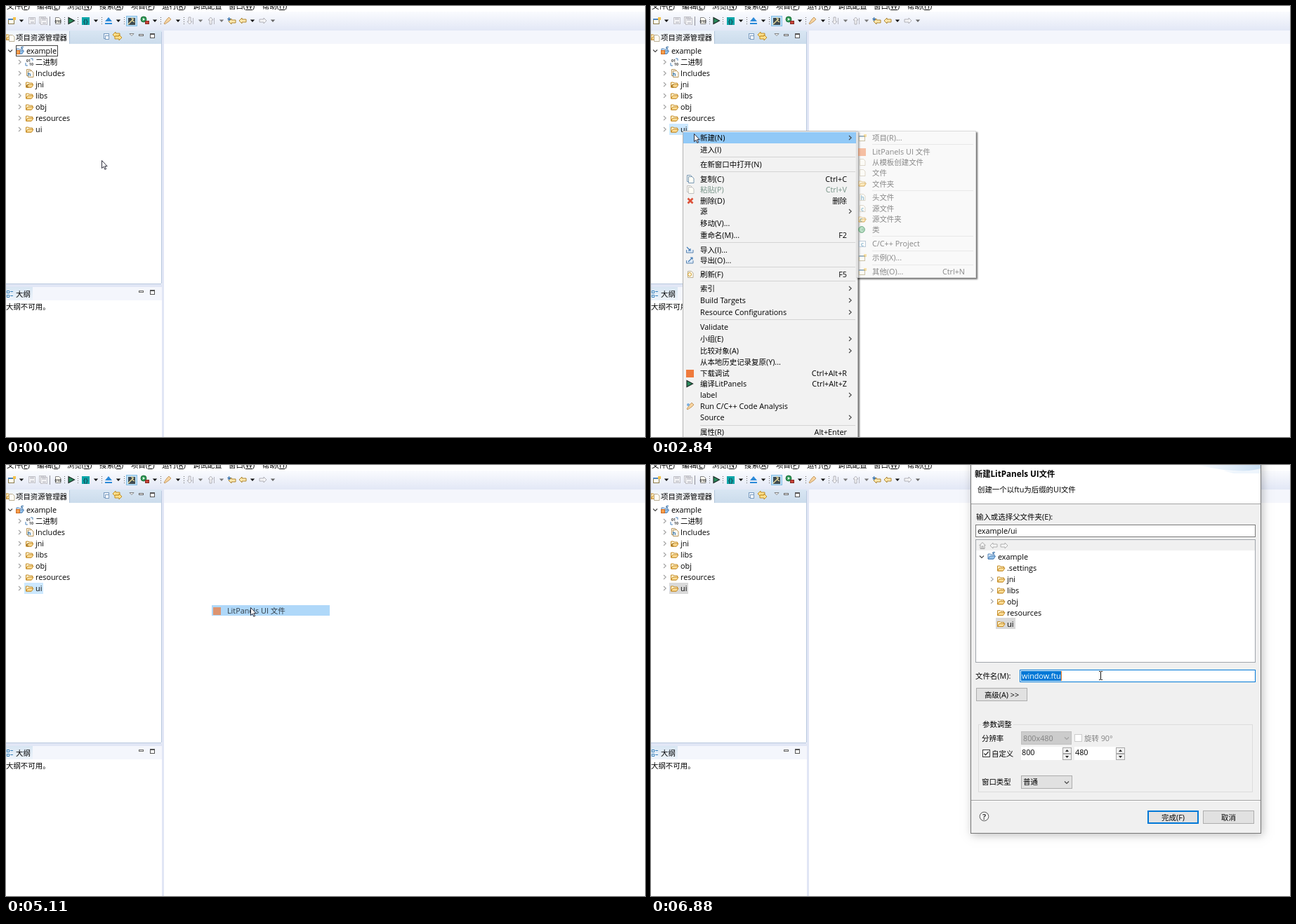
Animation, 910 px wide and 615 px high, one loop 7130 ms. Source, as an HTML page with a canvas:

```html
<!DOCTYPE html>
<html lang="zh-CN">
<head>
<meta charset="utf-8">
<style>
html, body { margin: 0; width: 910px; height: 615px; overflow: hidden; background: #fff; }
canvas { display: block; }
</style>
</head>
<body>
<canvas id="stage" width="910" height="615"></canvas>
<script>
const g = document.getElementById('stage').getContext('2d');
const LOOP = 7130, BLUE = '#0078d7', GOLD = '#c48a24', BRAND = 'LitPanels';

// ---- drawing helpers ----
function rect(x, y, w, h, fill, line) {
  if (fill) { g.fillStyle = fill; g.fillRect(x, y, w, h); }
  if (line) { g.strokeStyle = line; g.lineWidth = 1; g.strokeRect(x + .5, y + .5, w - 1, h - 1); }
}
function fade(y0, y1, a, b) {
  const f = g.createLinearGradient(0, y0, 0, y1);
  f.addColorStop(0, a); f.addColorStop(1, b);
  return f;
}
function shape(x, y, d, fill, line, width = 1) {
  const p = new Path2D(d);
  g.save();
  g.translate(x, y);
  if (fill) { g.fillStyle = fill; g.fill(p); }
  if (line) { g.strokeStyle = line; g.lineWidth = width; g.stroke(p); }
  g.restore();
}
function disc(x, y, r, fill, line) {
  g.beginPath(); g.arc(x, y, r, 0, 7);
  if (fill) { g.fillStyle = fill; g.fill(); }
  if (line) { g.strokeStyle = line; g.lineWidth = 1; g.stroke(); }
}
// Latin and Chinese runs have slightly different sizes; returns the end x.
function text(s, x, y, color = '#000', align = 0, scale = 1, weight = '') {
  const runs = s.match(/[\x00-\xff]+|[^\x00-\xff]+/g).map(r => {
    const size = (r.charCodeAt(0) < 256 ? 10.8 : 10.45) * scale;
    const font = `${weight} ${size}px "Open Sans","Noto Sans CJK SC","Noto Sans CJK",sans-serif`;
    g.font = font;
    return [r, font, g.measureText(r).width];
  });
  x -= align * runs.reduce((sum, r) => sum + r[2], 0);
  g.fillStyle = color;
  for (const [r, font, w] of runs) { g.font = font; g.fillText(r, x, y); x += w; }
  return x;
}
// Only the part outside the box is painted, so a translucent box stays clean.
function shadow(x, y, w, h, blur, offset, alpha) {
  g.save();
  g.beginPath();
  g.rect(-100, -200, 1200, 1000);
  g.rect(x, y, w, h);
  g.clip('evenodd');
  g.shadowColor = `rgba(0,0,0,${alpha})`;
  g.shadowBlur = blur;
  g.shadowOffsetX = g.shadowOffsetY = offset;
  rect(x, y, w, h, '#000');
  g.restore();
}

// ---- icons, placed by their centre ----
const right = (x, y, c = '#a0a0a0') => shape(x, y, 'M-2 -3L1.2 0L-2 3', null, c, 1.1);
const down = (x, y, c = '#444') => shape(x, y, 'M-3 -1.5L0 1.5L3 -1.5', null, c, 1.1);
const caret = (x, c = '#111') => shape(x, 21, 'M-3.2 -1.5H3.2L0 2Z', c);
const dots = x => { for (let y = 16; y < 28; y += 3) rect(x, y, 1, 1, '#666'); };
const play = (x, y) => shape(x, y, 'M-4 -4.5L4.5 0L-4 4.5Z', '#2a8a5c', '#1c2a26', 1.2);
const brandMark = (x, y) => rect(x - 5, y - 5, 11, 11, '#ef7a3c');
function folder(x, y, back = '#fff3cf', front = '#ffe09a', line = GOLD) {
  shape(x - 5.5, y - 4.5, 'M.5 8.5V1.5H4L5 2.5H9.5V4.5L8 8.5Z', back, line);
  shape(x - 5.5, y - 4.5, 'M.5 8.5L3 4.5H11L8.5 8.5Z', front, line);
}
const hook = (x, y) => shape(x, y, 'M5 -5.5H2.5Q1 -4.5 2.5 -3.5H4', null, '#2d6aa5', 1.2);
function project(x, y) { folder(x, y, '#dcecfa', '#9cc8ee', '#4b7fb5'); hook(x, y); }
function openProject(x, y) {
  project(x, y);
  rect(x - 6, y - 1, 6, 6, '#f6a04d', '#cf6b22');
}
function page(x, y, letter, line = '#b5a88a') {
  shape(x, y, 'M-3.5 -4.5H1.5L4 -2V4.5H-3.5Z', '#fffdf5', line, .9);
  if (letter) text(letter, x + .2, y + 3.5, '#2f7fae', .5, .75, 'bold');
}
function pages(x, y, line) { page(x - 1, y - 1, '', line); page(x + 1, y + 1, '', line); }
function newWindow(x, y) {
  rect(x - 5, y - 3, 9, 8, '#fffdf0', '#8c7b4a');
  rect(x - 5, y - 3, 9, 2, '#4f86bd');
  rect(x + 2, y - 5, 4, 4, '#f3c14a');
}
function arrow(x, y, flip, fill, line) {
  const s = flip ? -1 : 1;
  shape(x, y, `M${-5 * s} 0L${-s} -4V-2H${5 * s}V2H${-s}V4Z`, fill, line, .9);
}
function tray(x, y, out) {
  shape(x, y, 'M-4.5 0V4H5V0', '#dbe9f7', '#5b83ae');
  shape(x, y, out ? 'M-2 2L4 -4M1 -4H4V-1' : 'M-4 -4L1 1M1 -2V1H-2', null, '#3d78b5', 1.1);
}
function disk(x, y) {
  rect(x - 5, y - 5, 10, 10, '#f4f4f6', '#c0c0c6');
  rect(x - 3, y - 4, 6, 3, '#d2d2d8');
  rect(x - 2, y + 1, 5, 4, '#d2d2d8');
}
function binaries(x, y) {
  text('01', x - 4, y - .5, '#333', 0, .48, 'bold');
  text('10', x, y + 5, '#333', 0, .48, 'bold');
  shape(x, y, 'M-5 1V5H-2M2 -5H5V-2', null, '#4a83bb');
}
function torch(x, y) { shape(x, y, 'M-5 4L-1 -2L2 -5L5 -2L2 1L-4 5Z', '#f6d3a0', '#b98a4c', .8); }

// ---- workbench ----
const MENU_BAR = [[1, '文件', 'F'], [44, '编辑', 'E'], [87, '浏览', 'N'], [133, '搜索', 'A'], [178, '项目', 'P'],
  [222, '运行', 'R'], [266, '调试配置'], [317, '窗口', 'W'], [365, '帮助', 'H']];

function toolbar() {
  rect(0, 8, 910, 27, fade(8, 34, '#fafbfe', '#e3e8f6'));
  newWindow(8, 21); caret(22);
  disk(37, 21); disk(52, 20); disk(54, 22);
  rect(62, 15, 1, 13, '#8f8f98');
  page(74, 21, '', '#777'); text('010', 74, 24, '#333', .5, .5, 'bold');
  play(93, 21);
  rect(108, 16, 11, 11, '#0aa5a8'); text('{}', 113.5, 25, '#174b55', .5, .8, 'bold'); caret(128);
  shape(146, 21, 'M-5 1L0 -5L5 1ZM-5 3H5V5H-5Z', '#2d8ad8'); caret(160);
  rect(171, 14, 16, 15, '#bfdff5', '#86bfe6');
  rect(174, 17, 10, 10, '#3f4a50');
  shape(179, 21, 'M-5 5L3 -3M0 -5L1 -2M4 2L1 0', null, '#eadb9a', 1.4);
  disc(196, 19, 4, '#2f9a56', '#1d6d3a');
  shape(196, 19, 'M-1.2 -2L2 0L-1.2 2Z', '#fff');
  rect(198, 21, 6, 5, '#c84238', '#832a24'); caret(212);
  torch(230, 21); caret(245);
  for (const [x, s] of [[262, 1], [292, -1]]) {
    shape(x, 21, `M-2 ${-5 * s}H1V${s}H3L-.5 ${5 * s}L-4 ${s}H-2Z`, '#f4f4f6', '#aaaab0', .9);
    rect(x + 4, 17, 1, 9, '#b5b5bd');
    caret(x + 15, '#777');
  }
  arrow(322, 22, 0, '#ffe9b0', '#a67c20');
  text('*', 315, 24, '#2d6aa5', 0, .9, 'bold');
  arrow(337, 21, 0, '#ffe9b0', '#a67c20'); caret(351);
  arrow(366, 21, 1, '#f4f4f6', '#aaaab0'); caret(380, '#666');
  [83, 102, 136, 168, 220, 253].forEach(dots);
}

function viewButtons(y) {
  rect(189, y - 2, 7, 3, '#fff', '#666');
  rect(205, y - 3, 7, 7, '#fff', '#555');
  rect(205, y - 3, 7, 2, '#555');
}

function workbench(t) {
  rect(0, 0, 910, 615, '#fff');
  for (const [x, label, key] of MENU_BAR) {
    if (!key) { text(label, x, 4); continue; }
    const a = text(label + '(', x, 4), b = text(key, a, 4);
    rect(a, 5, b - a, 1, '#000');
    text(')', b, 4);
  }
  toolbar();
  rect(222, 35, 3, 580, '#e1e6f5');
  rect(225, 35, 685, 19, '#f4f6fc');
  rect(0, 397, 222, 4, '#e1e6f5');

  // project explorer
  rect(0, 35, 222, 19, fade(35, 54, '#d9e6f3', '#cbdcec'));
  rect(0, 35, 90, 20, fade(35, 54, '#edf3fa', '#fff'));
  rect(90, 36, 1, 18, '#b3c6da');
  rect(221, 37, 1, 359, '#b9c9df');
  rect(0, 396, 221, 1, '#b9c9df');
  folder(5, 44); page(8, 46);
  text('项目资源管理器', 14, 49);
  rect(139, 39, 8, 8, '#eef4fb', '#7a9cc0'); rect(141, 42, 6, 6, '#fff', '#7a9cc0');
  arrow(157, 41, 0, '#ffe08a', '#b98418'); arrow(160, 45, 1, '#ffe08a', '#b98418');
  shape(179, 41, 'M-3 -1.5H3L0 1.5Z', '#fff', '#666', .8);
  viewButtons(42);

  down(6, 64); openProject(20, 64);
  text('example', 29, 68);
  if (t < 1330) rect(14, 56, 60, 16, null, '#444');
  const chosen = t >= 5290 ? '#d9d9d9' : t >= 1080 ? '#cce8ff' : t >= 885 ? '#e5f3ff' : null;
  rect(26, 168, 27, 16, chosen);
  ['二进制', 'Includes', 'jni', 'libs', 'obj', 'resources', 'ui'].forEach((name, i) => {
    const y = 80 + 16 * i;
    right(20, y);
    if (i == 0) binaries(33, y);
    else if (i == 1) { pages(34, y, '#b28b4a'); text('h', 33, y + 4, '#2f6fa5', .5, .7, 'bold'); }
    else folder(33.5, y);
    if (i == 2) text('c', 29, y + 4, '#8a5a10', 0, .65, 'bold');
    text(name, 42, y + 4);
  });

  // outline
  rect(0, 401, 222, 19, '#f4f6fc');
  rect(0, 401, 38, 19, fade(401, 420, '#d8e6f3', '#eef4fb'));
  for (const y of [406, 412]) { rect(1, y, 4, 4, '#fff', '#3a82bd'); rect(6, y + 1, 4, 1, '#3a82bd'); }
  text('大纲', 14, 415);
  viewButtons(408);
  text('大纲不可用。', 0, 433);
}

// ---- context menus: [centre y, label, shortcut or '>', icon] ----
const MAIN = [[188, '新建(N)', '>'], [205, '进入(I)'], [226, '在新窗口中打开(N)'],
  [247, '复制(C)', 'Ctrl+C', y => pages(56, y, '#6d8fae')],
  [262, '粘贴(P)', 'Ctrl+V', y => pages(56, y, '#bbb')],
  [278, '删除(D)', '删除', y => shape(56, y, 'M-3.5 -3.5L3.5 3.5M3.5 -3.5L-3.5 3.5', null, '#dc5038', 2.6)],
  [293, '源', '>'], [310, '移动(V)...'], [327, '重命名(M)...', 'F2'],
  [348, '导入(I)...', '', y => tray(55, y)], [363, '导出(O)...', '', y => tray(55, y, 1)],
  [383, '刷新(F)', 'F5', y => { page(56, y); disc(55, y, 2.5, null, '#d09a20'); }],
  [403, '索引', '>'], [420, 'Build Targets', '>'], [437, 'Resource Configurations', '>'],
  [458, 'Validate'], [475, '小组(E)', '>'], [492, '比较对象(A)', '>'], [508, '从本地历史记录复原(Y)...'],
  [524, '下载调试', 'Ctrl+Alt+R', y => brandMark(55, y)],
  [539, '编译' + BRAND, 'Ctrl+Alt+Z', y => play(55, y)], [555, 'label', '>'],
  [571, 'Run C/C++ Code Analysis', '', y => { torch(56, y); disc(53, y - 2, 2, '#79aee0'); }],
  [587, 'Source', '>'], [608, '属性(R)', 'Alt+Enter']];
const SUB = [[188, '项目(R)...', '', y => newWindow(301, y)],
  [208, BRAND + ' UI 文件', '', y => brandMark(300, y)],
  [223, '从模板创建文件', '', y => page(301, y)], [238, '文件', '', y => page(301, y)],
  [254, '文件夹', '', y => folder(301, y - 1)],
  [273, '头文件', '', y => page(301, y, 'h')], [289, '源文件', '', y => page(301, y, 'c')],
  [304, '源文件夹', '', y => { folder(301, y); text('c', 297, y + 4, '#2f7fae', 0, .75, 'bold'); }],
  [319, '类', '', y => { disc(300, y, 4.5, '#46a866', '#2d7d48'); text('C', 300, y + 3, '#fff', .5, .75, 'bold'); }],
  [339, 'C/C++ Project', '', y => { rect(296, y - 4, 10, 9, '#fff', '#6e8fae'); text('c', 301, y + 4, '#2f7fae', .5, .8, 'bold'); }],
  [359, '示例(X)...', '', y => newWindow(301, y)], [379, '其他(O)...', 'Ctrl+N', y => newWindow(301, y)]];

function item([y, label, key, icon], x, end) {
  if (icon) icon(y);
  const color = label[0] == '粘' ? '#779488' : '#000';
  text(label, x, y + 4, color);
  if (key == '>') right(284, y, '#444');
  else if (key) text(key, end, y + 4, color, 1);
}
// The shadow stands at full strength while the menu itself fades in.
function menu(alpha, x, y, w, h, items, lines, hot, pad, end) {
  if (!alpha) return;
  g.globalAlpha = 1;
  shadow(x, y, w, h, 2, 2, .55);
  g.globalAlpha = alpha;
  rect(x, y, w, h, '#f2f2f2', '#b4b4b4');
  if (hot >= 0) rect(x + 1, items[hot][0] - 8, w - 4, 16, '#91c9f7');
  for (const l of lines) rect(x + pad, l, w - pad - 4, 1, '#d4d4d4');
  for (const i of items) item(i, x + pad, end);
}

// ---- dialog ----
function button(x, y, w, h, label, focus) {
  rect(x, y, w, h, '#e1e1e1', focus ? BLUE : '#adadad');
  if (focus) rect(x + 1, y + 1, w - 2, h - 2, null, BLUE);
  text(label, x + w / 2, y + h / 2 + 4, '#000', .5);
}
function spinner(x, value) {
  rect(x, 402, 59, 19, '#fff');
  text(value, x + 1, 414);
  for (const [y, s] of [[403, 1], [412, -1]]) {
    rect(x + 59, y, 13, 9, '#f0f0f0', '#a8a8a8');
    shape(x + 65.5, y + 4.5, `M-2.5 ${1.5 * s}H2.5L0 ${-1.5 * s}Z`, '#222');
  }
}
function dialog(t) {
  shadow(455, -74, 414, 600, 12, 2, .26);
  rect(455, -74, 414, 600, '#f0f0f0');
  rect(455, -74, 414, 129, '#fff');
  const sky = g.createLinearGradient(770, 0, 868, 0);
  sky.addColorStop(0, '#fff'); sky.addColorStop(1, '#c9dff4');
  shape(0, 0, 'M770 -20H868V7Q830 13 775 -1Z', sky);
  shape(0, 0, 'M815 8Q845 11 868 5V12H830Z', '#eef5fc');
  rect(455, 55, 413, 1, '#a5a5a5');
  rect(455, -74, 414, 600, null, '#777');
  text(`新建${BRAND} UI文件`, 461, 17, '#000', 0, 1.08, 'bold');
  text('创建一个以ftu为后缀的UI文件', 465, 39);

  text('输入或选择父文件夹(E):', 463, 78);
  rect(462, 85, 399, 18, '#fff', '#7a7a7a');
  text('example/ui', 465, 98);

  rect(462, 106, 399, 176, '#fff', '#a0a5ab');
  rect(463, 107, 397, 15, '#f0f0f0');
  shape(472, 115, 'M-4.5 0L0 -4.5L4.5 0M-3 -1V4.5H3V-1M-1 4.5V1H1V4.5', '#f6f6f6', '#999', .9);
  arrow(488, 115, 0, '#f5f5f5', '#aaa'); arrow(503, 115, 1, '#f5f5f5', '#aaa');
  down(471, 131); project(485, 130);
  text('example', 494, 135);
  rect(491, 218, 28, 16, '#d9d9d9');
  ['.settings', 'jni', 'libs', 'obj', 'resources', 'ui'].forEach((name, i) => {
    const y = 147 + 15.9 * i;
    if (i > 0 && i < 4) right(486, y);
    folder(498.5, y);
    text(name, 507, y + 4);
  });

  text('文件名(M):', 462, 305);
  rect(525, 292, 336, 18, '#fff', BLUE);
  rect(527, 294, 58, 14, BLUE);
  text('window.ftu', 528, 305, '#fff');
  if (t < 5920 || t >= 6450) rect(584, 294, 1, 14, '#ff8728');
  button(463, 318, 73, 19, '高级(A) >>');

  rect(466, 370, 391, 97, null, '#dcdcdc');
  rect(470, 368, 46, 4, '#f0f0f0');
  text('参数调整', 472, 374);
  text('分辨率', 471, 394);
  rect(527, 380, 72, 19, '#ccc', '#bfbfbf');
  text('800x480', 530, 394, '#838383');
  down(592, 390, '#a0a0a0');
  rect(603, 384, 11, 11, '#fff', '#ccc');
  text('旋转 90°', 617, 394, '#838383');
  rect(472, 406, 11, 11, '#fff', '#333');
  shape(477.5, 411.5, 'M-3 0L-1 2.3L3.2 -2.5', null, '#222', 1.2);
  text('自定义', 485, 416);
  spinner(527, '800'); spinner(603, '480');
  text('窗口类型', 471, 456);
  rect(527, 443, 73, 19, '#e1e1e1', '#adadad');
  text('普通', 530, 456);
  down(592, 453);

  rect(456, 478, 412, 1, '#a0a0a0'); rect(456, 479, 412, 1, '#fff');
  disc(474.5, 501.5, 6.3, '#f8f8f8', '#555');
  text('?', 474.5, 505.5, '#444', .5, 1, 'bold');
  button(707, 493, 73, 19, '完成(F)', true);
  button(786, 493, 73, 19, '取消');
}

// ---- pointer: [start, end, steps, control x, y, target x, y] ----
const MOVES = [[50, 700, 11, 110, 264, 50, 184], [820, 1080, 5, 48, 181, 44, 177], [2280, 2480, 4, 54, 178, 61, 182],
  [2900, 3600, 11, 180, 186, 297, 187], [3670, 4180, 9, 325, 190, 348, 203], [6170, 6880, 11, 490, 250, 640, 300]];

// The screen was sampled at a steady beat, so positions hold between beats.
const beat = (t, a, b, n) => Math.floor((t - a) / (b - a) * (n - 1) + .03);

function pointer(t) {
  let x = 136, y = 220;
  for (const [a, b, n, cx, cy, ex, ey] of MOVES) {
    if (t < a) break;
    const p = Math.min(1, (beat(t, a, b, n) + 1) / n), u = p * p * (3 - 2 * p), v = 1 - u;
    x = v * v * x + 2 * u * v * cx + u * u * ex;
    y = v * v * y + 2 * u * v * cy + u * u * ey;
  }
  return [Math.round(x), Math.round(y)];
}

function drawPointer(x, y, t) {
  if (t > 6170 && x > 525 && y >= 292)
    shape(x + .5, y, 'M-2.5 -5.5H-1L0 -5L1 -5.5H2.5M0 -5V6M-2.5 6.5H-1L0 6L1 6.5H2.5', null, '#111');
  else shape(x + .5, y + .5, 'M0 0V11L2.6 8.7L4.4 12.8L6.1 12L4.3 8.1H7.6Z', '#fff', '#1a1a2a', .9);
}

const clamp = v => Math.max(0, Math.min(1, v));

function draw(t) {
  const [x, y] = pointer(t);
  workbench(t);
  if (t >= 2140 && t < 5110) {
    const hot = x < 293 ? -1 : y < 198 ? 0 : 1;
    menu(clamp((t - 2070) / 200), 45, 178, 250, 450, MAIN, [215, 236, 337, 372, 392, 447, 598],
      t >= 2350 ? 0 : -1, 25, 279);
    menu(clamp((t - 2750) / 200), 292, 178, 171, 210, SUB, [197, 263, 328, 349, 369], hot, 23, 447);
  } else if (t >= 5110) {
    const h = 5110 + Math.min(7, beat(t, 5110, 5540, 8)) * 430 / 7;
    g.globalAlpha = clamp(.72 - (h - 5110) / 260);
    if (g.globalAlpha) { rect(293, 200, 168, 15, '#91c9f7'); item(SUB[1], 315, 447); }
    const p = clamp((h - 5290) / 210);
    if (p) {
      const s = 1 - .08 * (1 - p) ** 3;
      g.save();
      g.globalAlpha = clamp(p * 1.8);
      g.translate(661.5, 226); g.scale(s, s); g.translate(-661.5, -226);
      dialog(t);
      g.restore();
    }
  }
  g.globalAlpha = 1;
  drawPointer(x, y, t);
}

const start = performance.now();
function tick() {
  draw((performance.now() - start) % LOOP);
  requestAnimationFrame(tick);
}
tick();
</script>
</body>
</html>
```
